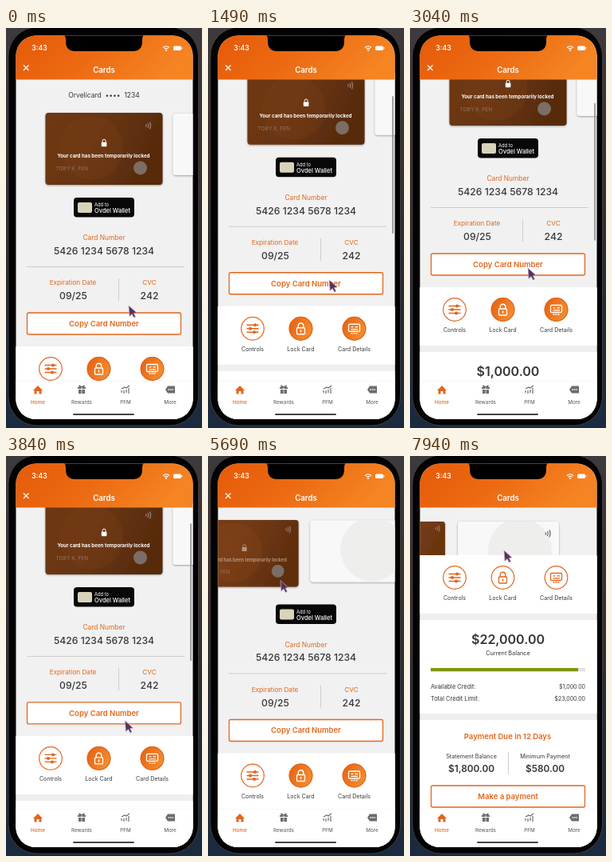
Recreate the animation shown at these times as an HTML page. Size 246 by 500 pixels, loop 7990 ms.

```html
<!DOCTYPE html>
<html lang="en">
<head>
<meta charset="utf-8">
<title>Card screen</title>
<style>
  html, body { margin: 0; width: 100%; height: 100%; overflow: hidden; background: #20262f; }
  #stage { display: block; width: 100vw; height: 100vh; font-family: Inter, Roboto, sans-serif; }
</style>
</head>
<body>
<svg id="stage" viewBox="0 0 246 500"></svg>
<script>
const LOOP = 7990;
const ORANGE = '#e2661c', INK = '#363638', GRAY = '#6c6c70';

// Text placed by its vertical centre.
const text = (x, y, size, str, { fill = INK, weight = 400, anchor = 'middle', id = '' } = {}) =>
  `<text ${id && `id="${id}"`} x="${x}" y="${y + size * 0.36}" font-size="${size}" fill="${fill}"
    font-weight="${weight}" text-anchor="${anchor}">${str}</text>`;
const rect = (x, y, w, h, fill, extra = '') =>
  `<rect x="${x}" y="${y}" width="${w}" height="${h}" fill="${fill}" ${extra}/>`;
const line = (d, color, width = 1, extra = '') =>
  `<path d="${d}" fill="none" stroke="${color}" stroke-width="${width}" ${extra}/>`;
const at = (x, y, body) => `<g transform="translate(${x} ${y})">${body}</g>`;
const button = (y, h, label) =>
  rect(26.5, y, 193, h, '#fff', `rx="2" stroke="${ORANGE}" stroke-width="1.3"`) +
  text(123, y + h / 2, 9.5, label, { fill: ORANGE, weight: 600 });

const waves = color => line('M-4-1.5Q-3 0-4 1.5M-1.5-3Q0 0-1.5 3M1-4.5Q3 0 1 4.5', color, 1.4);

const sliders = c => line('M-7.5-4.5H7.5M-7.5 0H7.5M-7.5 4.5H7.5', c, 1.3) +
  [[3, -4.5], [-3, 0], [2, 4.5]].map(([x, y]) => `<circle cx="${x}" cy="${y}" r="2" fill="${c}"/>`).join('');
const lock = c => line('M-3.3-1V-3.5A3.3 3.3 0 0 1 3.3-3.5V-1', c, 1.4) +
  rect(-5, -1, 10, 8, 'none', `rx="1" stroke="${c}" stroke-width="1.3"`) +
  line('M0 1.5V4.5', c, 1.5);
const cardIcon = c => rect(-7, -5.5, 14, 9, 'none', `rx="1.2" stroke="${c}" stroke-width="1.3"`) +
  line('M-4-2.2H-1M1-2.2H4.5M-4 .8H4.5', c, 1.2) + line('M-4 6H4', c, 1.3, 'stroke-dasharray="2 1"');

const ring = filled => `<circle r="14.3" fill="${filled ? 'url(#fillOrange)' : '#fff'}" stroke="${ORANGE}" stroke-width="1.2"/>`;
const action = (x, label, icon, toggles) => at(x, 0,
  ring(false) + icon(ORANGE) +
  (toggles ? `<g class="active">${ring(true)}${icon('#fff')}</g>` : '') +
  text(0, 25.5, 7.1, label));

const lockedCard = `<g id="lockedCard">
  ${rect(0, 0, 147, 90, 'url(#brown)', 'rx="4" filter="url(#shadow)"')}
  <circle cx="58" cy="44" r="40" fill="#a5572033"/>
  <g id="lockShade">${rect(0, 0, 147, 90, '#1c0c00', 'rx="4" opacity=".22"')}</g>
  <g id="tapMark">${waves('#8f7768')}</g>
  <circle cx="119" cy="69" r="8.5" fill="#7c6d66"/>
  ${text(13, 70, 6.6, 'TOBY K. FEN', { fill: '#8f7465', anchor: 'start' })}
  <g id="lockNote">
    ${line('M71.6 37v-1.8a2 2 0 0 1 4 0V37', '#fff', 1)}${rect(70.3, 36.8, 6.6, 5.4, '#fff', 'rx=".8"')}
    ${text(73, 54, 6.2, 'Your card has been temporarily locked', { fill: '#fff', weight: 700 })}
  </g></g>`;

const whiteCard = `<g id="whiteCard">
  ${rect(0, 0, 127, 77, '#f8f8f8', 'rx="4" filter="url(#shadow)"')}
  <svg width="127" height="77"><circle cx="78" cy="36" r="40" fill="#eeeeed"/></svg>
  ${at(114, 15, waves('#77777a'))}</g>`;

const details = `
  ${rect(85, 212, 76, 24.5, '#080808', 'rx="4"')}${rect(90, 218, 18, 13, '#d9d3bb', 'rx="2"')}
  ${text(111, 221, 5.8, 'Add to', { fill: '#fff', anchor: 'start' })}
  ${text(111, 228.5, 7.5, 'Ovdel Wallet', { fill: '#fff', weight: 500, anchor: 'start' })}
  ${text(123, 262, 8.4, 'Card Number', { fill: ORANGE })}
  ${text(123, 278.5, 12.2, '5426 1234 5678 1234', { weight: 500 })}
  ${line('M26 298.5H224M141.5 313V341', '#c9c9c9', 0.9)}
  ${text(84, 318.5, 8.2, 'Expiration Date', { fill: ORANGE })}${text(84.5, 335, 12.2, '09/25', { weight: 500 })}
  ${text(180, 318.5, 8.2, 'CVC', { fill: ORANGE })}${text(180, 335, 12.2, '242', { weight: 500 })}
  ${button(356, 27, 'Copy Card Number')}`;

// Vertical origin is the centre of the action icons.
const panels = `
  ${rect(12, -27, 223, 420, '#efefef')}
  ${rect(12, -28, 223, 73, '#fff')}${rect(12, 53, 223, 117, '#fff')}${rect(12, 178, 223, 160, '#fff')}
  ${action(56, 'Controls', sliders)}${action(116.5, 'Lock Card', lock, true)}${action(183.5, 'Card Details', cardIcon, true)}
  ${text(123, 77, 16, '', { weight: 600, id: 'balance' })}${text(123, 94, 7.3, 'Current Balance')}
  ${rect(26, 113, 194, 4.2, '#e2e2e2')}${rect(26, 113, 185, 4.2, '#82960f')}
  ${text(26, 136, 7.4, 'Available Credit:', { anchor: 'start' })}${text(220, 136, 7, '$1,000.00', { anchor: 'end' })}
  ${text(26, 151, 7.4, 'Total Credit Limit:', { anchor: 'start' })}${text(220, 151, 7, '$23,000.00', { anchor: 'end' })}
  ${text(122.5, 199, 9.5, 'Payment Due in 12 Days', { fill: ORANGE, weight: 600 })}
  ${text(77, 223, 7.2, 'Statement Balance')}${text(77, 238.5, 11.8, '$1,800.00', { weight: 600 })}
  ${text(169.5, 223, 7.2, 'Minimum Payment')}${text(169.5, 238.5, 11.8, '$580.00', { weight: 600 })}
  ${line('M123.5 218V246', '#c9c9c9', 0.9)}${button(260, 27, 'Make a payment')}`;

const nav = `
  ${rect(12, 441.5, 223, 50, '#fff')}${line('M12 441.5H235', '#f4f4f4', 0.8)}
  <path d="M34 453L40 447L46 453H44.5V457.5H41.5V454H38.5V457.5H35.5V453Z" fill="${ORANGE}"/>
  ${at(95, 452, `<path d="M-5-3H5V-1H-5ZM-4 0H4V5H-4Z" fill="${GRAY}"/>` +
    line('M0-3C-5-3-4-7 0-3C4-7 5-3 0-3', GRAY, 1.2) + line('M0-3V5', '#fff', 0.8))}
  ${at(150, 452, line('M-5 4V1M-2 5V1M1 4V0M4 5V-2M-5-1L-1-3L1-2L5-5', GRAY, 1.2))}
  ${at(206, 452, `<path d="M-6 0L-3-4.5H6V4.5H-3Z" fill="${GRAY}"/>` +
    line('M-2.5 0H4', '#fff', 1.6, 'stroke-dasharray="1.6 1"'))}
  ${[[40, 'Home', ORANGE], [95, 'Rewards', GRAY], [150, 'PFM', GRAY], [206, 'More', GRAY]]
    .map(([x, label, fill]) => text(x, 467.5, 6.3, label, { fill, weight: 500 })).join('')}
  ${rect(84, 482, 77, 2, '#444', 'rx="1"')}`;

const header = `
  ${rect(12, 9, 223, 55.5, 'url(#headerOrange)')}
  <path d="M71 8Q75 9 75 14V17Q75 29 87 29H159Q171 29 171 17V14Q171 9 175 8Z" fill="#000"/>
  ${text(42, 25, 8.6, '3:43', { fill: '#fff', weight: 600 })}
  ${at(201, 28, line('M-4-3.5Q0-7 4-3.5M-2.3-1.7Q0-3.6 2.3-1.7', '#fff', 1.2) + '<circle r="1" fill="#fff"/>')}
  ${rect(210, 22.5, 10, 5.5, '#fff', 'rx="1.5"')}${rect(220.5, 24.2, 1, 2, '#fff')}
  ${line('M22 46.5L28.5 53M28.5 46.5L22 53', '#fff', 1.2, 'id="closeMark"')}
  ${text(123, 53, 9.7, 'Cards', { fill: '#fff', weight: 600 })}`;

const gradient = (id, coords, ...colors) => `<linearGradient id="${id}" ${coords}>` +
  colors.map((c, i) => `<stop offset="${i / (colors.length - 1)}" stop-color="${c}"/>`).join('') + '</linearGradient>';

document.getElementById('stage').innerHTML = `
  <defs>
    ${gradient('backdrop', 'x2="0" y2="1"', '#3d3a3d', '#40302c', '#262b35', '#1b2a40')}
    ${gradient('headerOrange', 'x2="1" y2=".25"', '#e65a0a', '#ec6a12', '#f58423')}
    ${gradient('fillOrange', 'x2="1" y2=".5"', '#e65f0e', '#f28c30')}
    ${gradient('brown', 'x2="1" y2=".3"', '#864516', '#7e421a', '#68340f')}
    <filter id="shadow"><feDropShadow dx="0" dy=".8" stdDeviation="1.1" flood-opacity=".4"/></filter>
    <clipPath id="screen"><rect x="12.5" y="9.5" width="222" height="479.5" rx="25"/></clipPath>
  </defs>
  ${rect(0, 0, 246, 500, 'url(#backdrop)')}
  ${rect(3, -1, 238.5, 498, '#030303', 'rx="36" stroke="#3c3d41"')}
  <g clip-path="url(#screen)">
    ${rect(12, 9, 223, 481, '#f1f1f1')}
    <g id="content">
      ${text(123, 84, 8.5, 'Orvelicard&#160; •••• &#160;1234')}
      ${whiteCard}${lockedCard}<g id="details">${details}</g>
    </g>
    <g id="panels">${panels}</g>
    ${rect(231, 0, 2, 172, '#8c8c8c', 'id="scrollbar" rx="1"')}
    ${nav}${header}
  </g>
  <path id="cursor" d="M0 0L1 13.5L4 10.5L6.5 15L8.5 14L6.3 9.5L10 9Z" fill="#553458" stroke="#c9a9c8" stroke-width=".7"/>`;

const el = Object.fromEntries([...document.querySelectorAll('[id]')].map(e => [e.id, e]));
const activeIcons = document.querySelectorAll('.active');

// Each key is [time, value]; motion eases between neighbouring keys.
const scrollKeys = [[80, 0], [840, 43], [1300, 48], [2190, 67], [3040, 74], [3400, 74], [4200, 29], [5400, 29], [5900, 25]];
const cursorX = [[0, 154], [840, 155], [2190, 149], [3040, 148], [4700, 151], [5350, 151], [5850, 72], [6500, 72], [7500, 118]];
const cursorY = [[80, 347], [840, 299], [1300, 316], [2190, 308], [3040, 300], [3400, 300], [4100, 345],
  [4700, 154], [5350, 154], [5850, 156], [6500, 156], [7500, 118]];
const swipeKeys = [[5400, 0], [5950, 1]];
const collapseKeys = [[5800, 0], [6100, 1]];
const fadeKeys = [[5850, 1], [6300, 0]];
const barKeys = [[80, 0], [200, 0.8], [5200, 0.8], [5500, 0]];

const mix = (a, b, p) => a + (b - a) * p;
function sample(keys, t) {
  const next = keys.findIndex(k => k[0] > t);
  if (next === 0) return keys[0][1];
  if (next < 0) return keys[keys.length - 1][1];
  const [t0, a] = keys[next - 1], [t1, b] = keys[next];
  const p = (t - t0) / (t1 - t0);
  return mix(a, b, p * p * (3 - 2 * p));
}
const move = (node, x, y, scale = 1) => node.setAttribute('transform', `translate(${x} ${y}) scale(${scale})`);
const fade = (node, opacity) => node.setAttribute('opacity', opacity);

function draw(t) {
  const scroll = sample(scrollKeys, t), swipe = sample(swipeKeys, t), collapse = sample(collapseKeys, t);
  move(el.content, 0, -scroll);
  move(el.lockedCard, mix(49.5, -83, swipe), mix(106, 107, swipe), mix(1, 127 / 147, swipe));
  move(el.tapMark, mix(130, 137, swipe), mix(16, 10, swipe));
  move(el.whiteCard, mix(209.5, 60, swipe), 107);
  move(el.panels, 0, mix(426 - scroll, 152, collapse));
  move(el.cursor, sample(cursorX, t), sample(cursorY, t));
  fade(el.lockNote, 1 - swipe);
  fade(el.lockShade, 1 - swipe);
  fade(el.details, sample(fadeKeys, t));
  fade(el.closeMark, 1 - collapse);
  activeIcons.forEach(icon => fade(icon, 1 - collapse));
  el.scrollbar.setAttribute('y', 67 + scroll * 0.36);
  fade(el.scrollbar, sample(barKeys, t));
  el.balance.textContent = t < 5850 ? '$1,000.00' : '$22,000.00';
}

const start = performance.now();
function tick() {
  draw((performance.now() - start) % LOOP);
  requestAnimationFrame(tick);
}
tick();
</script>
</body>
</html>
```
